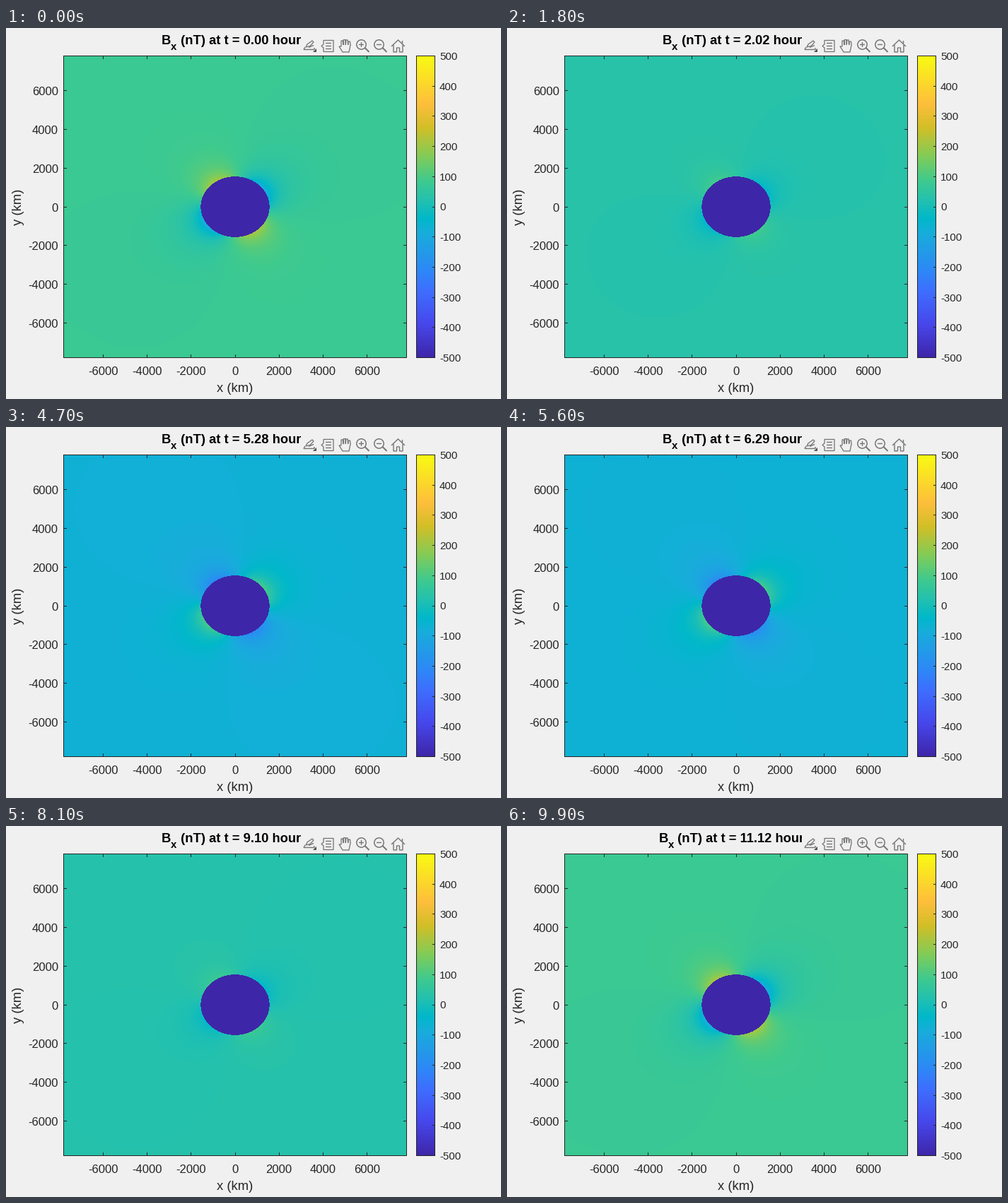
Write a matplotlib script that moves like this. It is 700 px wide and 525 px high and loops after 10000 ms.

```python
import numpy as np
import matplotlib.pyplot as plt
from matplotlib.animation import FuncAnimation
from matplotlib.colors import LinearSegmentedColormap
from matplotlib.patches import Circle, Polygon, Rectangle

W, H, DPI = 700, 525, 100
PX = 72 / DPI                     # points per pixel
FRAMES, STEP = 100, 0.11235       # hours per frame
RADIUS, SPAN = 1565, 7800         # km
BX, BY = 75, 200                  # background field amplitude, nT
LEFT, RIGHT, TOP, BOTTOM = 81, 567, 39, 467
INK, PAPER, ICON = "#262626", "#f0f0f0", "#757575"

# Key colours of the parula map, by position out of 63
KEYS = {0: "#3e26a8", 7: "#4747eb", 14: "#3e6fff", 18: "#2e87f7",
        26: "#18addb", 29: "#01b8ca", 33: "#24c1ae", 37: "#3fca8e",
        42: "#81cc59", 48: "#d1bf27", 53: "#febe3c", 63: "#f9fb14"}
cmap = LinearSegmentedColormap.from_list(
    "parula", [(k / 63, c) for k, c in KEYS.items()], N=256)

plt.rcParams["font.family"] = "Liberation Sans"
fig = plt.figure(figsize=(W / DPI, H / DPI), dpi=DPI, facecolor=PAPER)
ax = fig.add_axes([0, 0, 1, 1])


def line(xs, ys, color=INK, width=1, zorder=3):
    ax.plot(xs, ys, color=color, lw=width * PX, snap=False, zorder=zorder,
            solid_capstyle="butt", solid_joinstyle="miter")


def label(x, y, s, size, ha="left", color=INK, **kw):
    return ax.text(x, y, s, fontsize=size * PX, ha=ha, va="baseline",
                   color=color, **kw)


def panel(data, x0, x1):
    """Image with a crisp one-pixel border just inside its edges."""
    a, b, c, d = x0 + .5, x1 - .5, TOP + .5, BOTTOM - .5
    line([a, b, b, a, a], [c, c, d, d, c])
    return ax.imshow(data, cmap=cmap, vmin=-500, vmax=500, aspect="auto",
                     interpolation="nearest", extent=[x0, x1, BOTTOM, TOP])


# Induced dipole in the equatorial plane, for a unit background phase
nx, ny = RIGHT - LEFT, BOTTOM - TOP
X, Y = np.meshgrid(np.linspace(-SPAN, SPAN, nx), np.linspace(SPAN, -SPAN, ny))
R = np.hypot(X, Y)
mx, my = -BX / 2, -BY / 2
unit_field = BX + RADIUS**3 * (3 * X * (mx * X + my * Y) - mx * R**2) / R**5


def field(phase):
    return np.where(R < RADIUS, -500, unit_field * np.cos(2 * np.pi * phase))


image = panel(field(0), LEFT, RIGHT)
panel(np.linspace(500, -500, 256)[:, None], 580, 607)

# Ticks and labels
cx, cy = (LEFT + RIGHT) / 2, (TOP + BOTTOM) / 2


def pixel(v):
    return np.floor(v) + .5


for v in range(-6000, 6001, 2000):
    tx = cx + v / SPAN * (nx - 1) / 2
    ty = cy - v / SPAN * (ny - 1) / 2
    for a in (TOP, BOTTOM - 5):
        line([pixel(tx)] * 2, [a, a + 5])
    for a in (LEFT, RIGHT - 5):
        line([a, a + 5], [pixel(ty)] * 2)
    label(tx, 491, v, 16.67, "center")
    label(74, ty + 6.5, v, 16.67, "right")
for v in range(-500, 501, 100):
    ty = cy - v / 500 * (ny - 1) / 2
    line([603, 607], [pixel(ty)] * 2)
    label(613, ty + 5.5, v, 15)
label(cx, 515, "x (km)", 18.33, "center")
label(22, cy, "y (km)", 18.33, "center", rotation=90, rotation_mode="anchor")

bold = dict(color="black", weight="bold")
title = [(label(0, 23, "B", 18.33, **bold), 0),
         (label(0, 31, "x", 15, **bold), 13.3),
         (label(0, 23, "", 18.33, **bold), 21.6)]

# Toolbar, covering the end of the title
ax.add_patch(Rectangle((417, 12), 149, 26, fc=PAPER, ec="none", zorder=5))


def stroke(*pts, width=1.4):
    line(*zip(*pts), color=ICON, width=width, zorder=6)


def shape(*pts, fc="none", ec=ICON):
    ax.add_patch(Polygon(pts, fc=fc, ec=ec, lw=1.3 * PX, zorder=6))


def export_icon(x, y):
    stroke((x - 6, y + 2), (x - 8, y + 5.5), (x + 7, y + 5.5), (x + 7, y + 3))
    shape((x - 5, y + 2), (x - 3, y - 2), (x + 4, y - 7), (x + 6, y - 5),
          (x + 1, y + .5))
    stroke((x - 1, y + 2.5), (x + 6, y - .5))
    shape((x + 5, y + 8.5), (x + 10, y + 8.5), (x + 10, y + 3.5),
          fc="#505050", ec="none")


def tip_icon(x, y):
    shape((x - 6, y - 8), (x + 8, y - 8), (x + 8, y + 8), (x - 6, y + 8),
          (x - 6, y + 2.5), (x - 9, y), (x - 6, y - 2.5))
    for dy in (-4, 0, 4):
        stroke((x - 3, y + dy), (x + 5, y + dy))


def hand_icon(x, y):
    pts = [(x - 4, y + 8.5), (x - 9, y + .5), (x - 6, y + .5)]
    for i in range(4):
        fx, tip = x - 6 + 3.4 * i, y - 9 + .9 * (i - 1.3)**2
        pts += [(fx, tip), (fx + 2.3, tip), (fx + 2.9, y - 1.5)]
    shape(*pts, (x + 5, y + 8.5))


def zoom_icon(x, y, plus):
    ax.add_patch(Circle((x, y), 6.7, fc="none", ec=ICON, lw=1.5 * PX, zorder=6))
    stroke((x + 5, y + 4.5), (x + 11, y + 10.5), width=2)
    stroke((x - 3.5, y), (x + 3.5, y))
    if plus:
        stroke((x, y - 3.5), (x, y + 3.5))


def home_icon(x, y):
    stroke((x - 9.5, y), (x, y - 9), (x + 9.5, y))
    for s in (-1, 1):
        stroke((x + s * 6.5, y - 2), (x + s * 6.5, y + 8),
               (x + s * 2, y + 8), (x + s * 2, y + 2), (x, y + 2))
    stroke((x + 6, y - 4), (x + 6, y - 8))


export_icon(429, 25)
tip_icon(455, 25.5)
hand_icon(480, 25.5)
zoom_icon(502.5, 23.5, True)
zoom_icon(527.5, 23.5, False)
home_icon(554.5, 26)

ax.set_xlim(0, W)
ax.set_ylim(H, 0)
ax.axis("off")


def update(i):
    image.set_data(field(i / FRAMES))
    clock = f"{i * STEP:.2f}"
    title[2][0].set_text(f" (nT) at t = {clock} hours")
    start = 220 - 5.1 * (len(clock) - 4)
    for part, offset in title:
        part.set_x(start + offset)
    return [image] + [part for part, _ in title]


anim = FuncAnimation(fig, update, frames=FRAMES, interval=100, repeat=True,
                     repeat_delay=0, blit=False)
plt.show()
```
